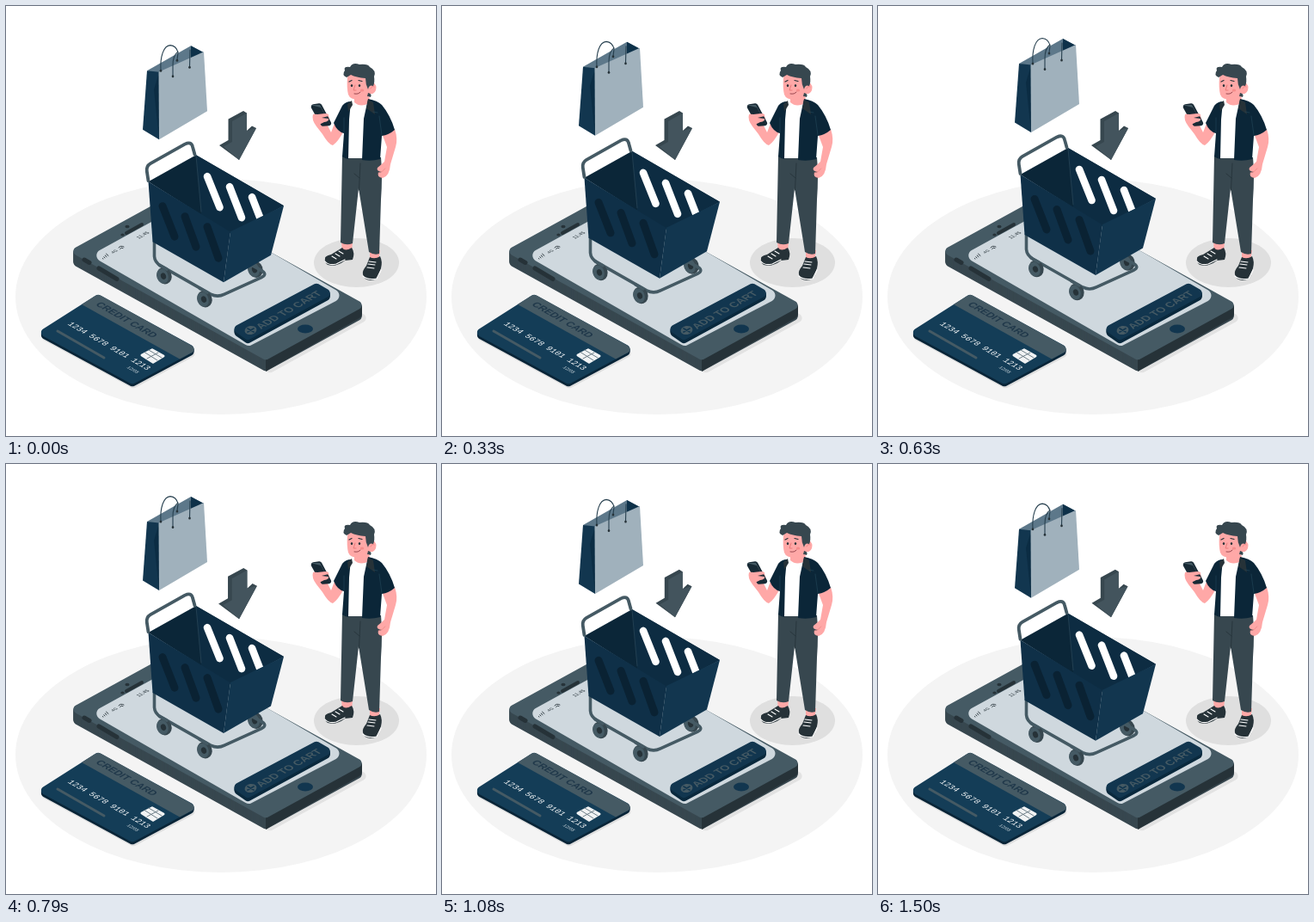
An HTML page with a canvas for the animation above (1.54 s loop, 500 by 500 pixels).

```html
<!DOCTYPE html>
<html lang="en">
<head>
<meta charset="utf-8">
<title>Add to cart</title>
<style>
html, body { margin: 0; width: 100%; height: 100%; overflow: hidden; background: #fff; }
canvas { display: block; width: 500px; height: 500px; }
</style>
</head>
<body>
<canvas id="stage" width="500" height="500"></canvas>
<script>
const ctx = document.getElementById('stage').getContext('2d');
const LOOP = 1540;
const GREY = '#455a64', DARK = '#37474f', INK = '#263238';
const NAVY = '#12364f', DEEP = '#0b2638', SKIN = '#ffa8a7', SCREEN = '#cfd8de';

function fill(color, d) {
  ctx.fillStyle = color;
  ctx.fill(new Path2D(d));
}

function line(color, width, d) {
  ctx.strokeStyle = color;
  ctx.lineWidth = width;
  ctx.lineCap = ctx.lineJoin = 'round';
  ctx.stroke(new Path2D(d));
}

function ellipse(color, x, y, rx, ry, angle = 0) {
  ctx.fillStyle = color;
  ctx.beginPath();
  ctx.ellipse(x, y, rx, ry, angle, 0, Math.PI * 2);
  ctx.fill();
}

// Polygon with rounded corners
function slab(color, points, radius, dy = 0) {
  const n = points.length, [ax, ay] = points[0], [bx, by] = points[n - 1];
  ctx.fillStyle = color;
  ctx.beginPath();
  ctx.moveTo((ax + bx) / 2, (ay + by) / 2 + dy);
  points.forEach(([x, y], i) => {
    const [nx, ny] = points[(i + 1) % n];
    ctx.arcTo(x, y + dy, nx, ny + dy, radius);
  });
  ctx.closePath();
  ctx.fill();
}

// Sides of a rounded slab of the given depth
function sides(color, points, radius, depth) {
  for (let dy = depth; dy > 0; dy--) slab(color, points, radius, dy);
}

// Text lying on the isometric floor; rise is 1 when it runs down to the right
function floorText(text, x, y, font, color, rise) {
  ctx.save();
  ctx.transform(0.87, 0.5 * rise, -0.87 * rise, 0.5, x, y);
  ctx.font = font;
  ctx.fillStyle = color;
  ctx.fillText(text, 0, 0);
  ctx.restore();
}

function drawPhone() {
  const body = [[73, 285], [190, 221], [419, 348], [302, 412]];
  slab('#e2e2e2', body.map(([x, y]) => [x + 5, y]), 5, 15);
  sides(DARK, body, 5, 13);
  fill(INK, 'M302 411L411 351.5L414 348V358Q414 361 411 363L305 423Q303 425 302 425Z');
  slab(GREY, body, 5);
  line(INK, 5, 'M91 295L97 298.5M108 305L129 317.5');
  slab(SCREEN, [[98, 290], [209, 229], [395, 337], [282, 396]], 7);

  line(INK, 4, 'M140 264L158 254');
  ellipse(INK, 135.5, 266, 2.2, 1.5);
  ellipse(INK, 141, 256.5, 2.6, 1.8);
  for (let i = 0; i < 4; i++) {
    const x = 113 + i * 2, y = 294 - i * 1.2;
    line(INK, 1, `M${x} ${y}l${-0.6 - i * 0.6} ${-0.4 - i * 0.6}`);
  }
  floorText('4G', 124.5, 288, '5px "Liberation Sans", sans-serif', INK, -1);
  line(INK, 0.9, 'M131 281Q133 278 137 280M132.5 282.5Q134 280 136 281.5');
  floorText('11:45', 154.5, 271, '6px "Liberation Sans", sans-serif', INK, -1);

  const button = [[261, 375], [361, 322], [382, 334], [281, 389]];
  sides('#0a293d', button, 5, 4);
  slab(NAVY, button, 5);
  ellipse(GREY, 284.5, 377, 7, 5, -0.2);
  line(NAVY, 1.7, 'M281 379L288 375M281 375L288 379');
  floorText('ADD TO CART', 296.5, 376, 'bold 12px "Liberation Sans", Arial, sans-serif', GREY, -1);
  ellipse(NAVY, 348, 375.5, 9, 5);
}

function drawCard() {
  const card = [[36, 380], [107, 335], [224, 399], [147, 440]];
  slab('#dedede', card.map(([x, y]) => [x + 1, y]), 5, 5);
  sides('#092538', card, 5, 3);
  slab('#143d57', card, 5);
  fill(GREY, 'M88 347L103 337.5Q107 335 111 337L216 395Q221 399 217 402.5L202 410.5Z');
  floorText('CREDIT CARD', 103.5, 347.5, 'bold 11.2px "Liberation Sans", Arial, sans-serif', '#20384a', 1);
  floorText('1234 5678 9101 1213', 71, 370, '9.4px "Liberation Mono", "Courier New", monospace', '#fff', 1);
  floorText('12/03', 140, 420.5, '5.5px "Liberation Sans", sans-serif', '#dce3e7', 1);
  line(GREY, 3, 'M60 378L114 409');
  slab('#f1f3f4', [[155, 406], [170, 398], [186, 407], [171, 416]], 1.5);
  line('#60727c', 0.9, 'M161 402.5L176 412M166 400L181 409M164 410L177 403');
}

function drawMan() {
  // legs and shoes
  fill(SKIN, 'M390 274H403L402 287L391 286ZM423 284H435L433 297H423Z');
  fill(INK, 'M371 294Q370 291 378 289L391 281Q394 286 402 281Q406 287 403 295L394 296Q384 304 374 301Q370 298 371 294Z');
  fill(INK, 'M415 312Q414 308 419 302L423 292Q429 295 435 291Q438 297 436 305L434 311Q433 318 424 319Q415 318 415 312Z');
  line('#fff', 1.2, 'M371 297Q375 302 384 300L394 295M415 314Q420 319 431 317L436 307');
  line('#fff', 1.1, 'M379 291l5 3M383 288l5 3M387 285l5 3M420 304l8 1M421 300l8 1M422 297l8 1');
  fill(DARK, 'M391 174L436 176Q438 198 436 225L434 288Q428 290 422 286L410 212L403 276Q396 279 389 275Z');
  line('#28363d', 1, 'M412 183L410.5 214M411 200L405 195');

  // arms
  fill(SKIN, 'M437 148L452 143Q456 155 453 164L447 184Q446 198 438 200Q431 199 433 194L437 193Q430 192 432 188Q437 184 440 181L443 164Z');
  line('#e98685', 0.7, 'M433 194Q438 193 441 189');
  fill(SKIN, 'M383 134L393 145Q386 158 380 162Q375 161 368 149L361 140Q355 132 357 126L367 123Q377 125 376 134L374 139L378 147Z');
  slab('#182a35', [[353, 115], [366, 113], [380, 139], [367, 140]], 3);
  fill(GREY, 'M354 115L365 115L377 138L378 140L366 118Z');
  fill(SKIN, 'M357 128Q357 125 362 126L371 125Q376 125 375 128L367 130L375 131Q376 134 370 135L364 138Z');

  // torso
  fill('#fff', 'M398 111L421 110L420 177H398Z');
  fill(SKIN, 'M405 103L422 99L423 112Q413 119 405 112Z');
  fill(DEEP, 'M401 111Q395 111 391 116L381 136Q385 146 393 148L391 175Q395 178 398 178L399 132Z');
  fill(DEEP, 'M421 108Q432 110 437 115Q447 127 452 144Q445 150 437 151L435 178Q425 181 414 179L416 131Z');
  fill(INK, 'M421 109L427 112L429 126L419 119ZM402 110L397 114L398 123L403 115Z');
  line('#24485c', 0.6, 'M434 128L437 150M393 130L393 147M427 123L432 124');

  // head
  fill(SKIN, 'M397 83Q398 76 410 76Q424 78 426 88Q432 92 430 98Q428 103 423 102Q421 109 411 109Q400 109 398 103Q396 95 397 83Z');
  fill(DARK, 'M396 83Q390 80 394 75Q392 70 400 71Q403 65 411 68Q421 67 423 71Q431 75 428 82Q429 89 427 93Q422 91 421 97Q418 91 418 84Q407 83 401 80Z');
  fill(DARK, 'M421 101Q426 102 424 106Q422 105 420 105Z');
  ellipse(INK, 402, 92.5, 1.2, 1.6);
  ellipse(INK, 411, 92.5, 1.2, 1.6);
  line(INK, 1.2, 'M399 88l3-1.5M410 86.5l4 1');
  line('#e77676', 0.9, 'M406 92L404 98L407 98');
  line('#8c3a43', 0.9, 'M405 102Q410 103 412 100');
  ellipse('#f58d8c', 414, 98, 2.2, 1.6);
  line('#e77676', 0.7, 'M424 96Q426 92 428 94');
}

function drawArrow(scale) {
  ctx.save();
  ctx.translate(270, 150);
  ctx.scale(scale, scale);
  ctx.translate(-270, -150);
  fill(DARK, 'M258.5 131.5L276 122L280 124.5V145L286 139.5L291 142L271 179L248 162L258.5 156Z');
  fill('#43545d', 'M263 134L280 124.5V145L291 142L271 179L253 163.5L263 158Z');
  ctx.restore();
}

function drawBag() {
  fill('#5d788a', 'M164 76L215 47L230 55L178 80Z');
  fill('#0e3149', 'M215 47L230 55L215 62Z');
  line('#263f4e', 1.1, 'M180 76C179 60 183 47 191 46.5Q198 47 200 55L199 64');
  fill(NAVY, 'M164 76L178 77.5V156L159 144.5Z');
  fill('#0b2c43', 'M178 78L172 98L178 156Z');
  fill('#a0b1bc', 'M177.5 77.5L230 54L234 123L178 156Z');
  line('#263f4e', 1.1, 'M194 82V70Q194 58 200 54M213.5 72L214 52');
  for (const [x, y] of [[180, 76], [194, 82.5], [199, 64], [213.5, 72]]) ellipse(INK, x, y, 1.3, 1.5);
}

function drawWheel(x, y) {
  ellipse(DARK, x + 1, y, 8.5, 10, -0.35);
  ellipse(GREY, x - 1, y + 0.5, 6.6, 8.6, -0.35);
  ellipse(INK, x, y + 0.5, 3, 3.8, -0.35);
}

function drawCart() {
  drawWheel(289, 307);
  line(GREY, 3.6, 'M172.5 274V292Q173 299 180 303L238 336Q246 340 254 336L297 316.5Q304 313 298 309L278 298');
  drawWheel(183, 314.5);
  drawWheel(230, 341.5);
  line(GREY, 3.5, 'M178 302L187 307M225 329L234 334');

  fill(DEEP, 'M165.5 205L221 174L323 233L261 265Z');
  fill('#0d2c42', 'M221 174L323 233L261 265L227 243Z');
  line('#294657', 0.8, 'M221 175L227 240');
  ctx.save();
  ctx.clip(new Path2D('M166 205L221 174L323 233L261 264Z'));
  line('#fff', 8.6, 'M234 199L248.5 235M260 211L274 247M286 223L300 259');
  ctx.restore();
  fill(NAVY, 'M261 263L323 233L308 290.5L253 322Z');
  fill('#0f3048', 'M165.5 205L261 263.5L253 322L170.5 275Z');
  line('#0a2233', 9, 'M182 233.5L196 269M208 245.5L221 281M234 257.5L247 294');
  line(GREY, 3.8, 'M165.5 204L163.8 193Q163 187 168 184L208 161.5Q215.5 158 217 164.5L219.5 173.5');
}

function shifted(y, draw) {
  ctx.save();
  ctx.translate(0, y);
  draw();
  ctx.restore();
}

// Straight up and down, highest at 705 ms
function lift(t) {
  const gap = Math.abs(t - 705);
  return -10 * (1 - Math.min(gap, LOOP - gap) / (LOOP / 2));
}

const pulse = [[0, 1], [330, 1], [500, 0.97], [790, 1.04], [1080, 0.975], [1500, 0.975], [LOOP, 1]];
function arrowScale(t) {
  const i = pulse.findIndex(([time]) => time > t);
  const [t0, s0] = pulse[i - 1], [t1, s1] = pulse[i];
  return s0 + (s1 - s0) * (t - t0) / (t1 - t0);
}

function render(now) {
  const t = now % LOOP, y = lift(t);
  ctx.fillStyle = '#fff';
  ctx.fillRect(0, 0, 500, 500);
  ellipse('#f4f4f4', 250, 338, 239, 137);
  ellipse('#dfdfdf', 407.5, 298.5, 49.5, 28.5);
  drawPhone();
  drawCard();
  drawMan();
  drawArrow(arrowScale(t));
  shifted(y, drawBag);
  shifted(y, drawCart);
}

const start = performance.now();
function tick() {
  render(performance.now() - start);
  requestAnimationFrame(tick);
}
tick();
</script>
</body>
</html>
```
